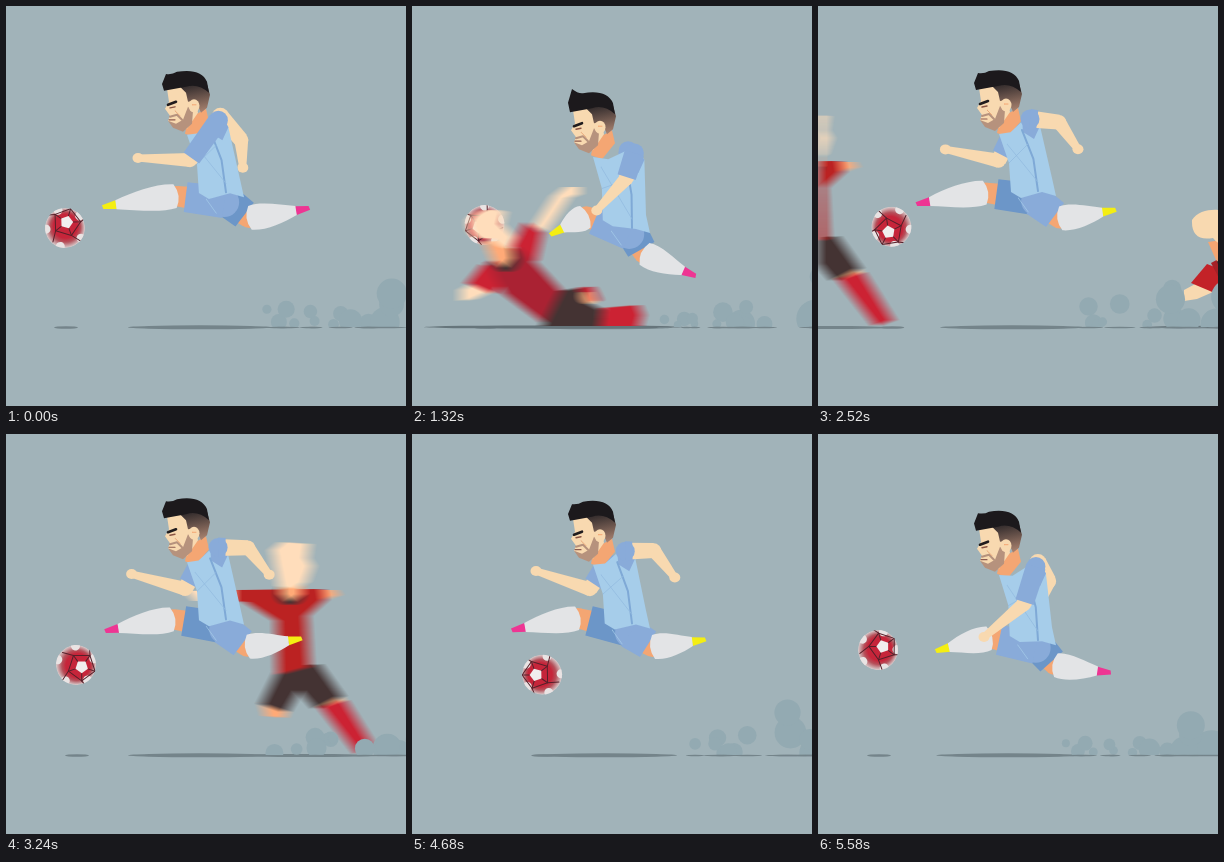
Animation, 400 px wide and 400 px high, one loop 5640 ms. Source, as an HTML page with a canvas:

```html
<!DOCTYPE html>
<html lang="en">
<head>
<meta charset="utf-8">
<title>Runner with ball</title>
<style>
html, body { margin: 0; width: 100%; height: 100%; overflow: hidden; background: #a1b3b9; }
canvas { display: block; width: 400px; height: 400px; }
</style>
</head>
<body>
<canvas id="stage" width="400" height="400"></canvas>
<script>
const stage = document.getElementById('stage').getContext('2d');
const STEP = 60, COUNT = 94, TAU = Math.PI * 2;
const STRIDE = COUNT / 8, HALF = STRIDE / 2;
const SKIN = '#f8d9b0', WARM = '#f4a673', SHIRT = '#a6cdea', BLUE = '#89abd9', DEEP = '#6c96c8';
const RED = '#a52127', BRIGHT = '#c32228', DARK = '#383230', SHADE = '#74848a', DUST = '#93aab2';
let g = stage;

const mod = (a, n) => ((a % n) + n) % n;
const mix = (a, b, u) => a + (b - a) * u;
const clamp = u => Math.max(0, Math.min(1, u));
const rand = n => mod(Math.sin(n * 12.9898 + 4.1) * 43758.5453, 1);

// Eases through a closed loop of key poses; each key is [time, ...values]
function pose(keys, period, t) {
  t = mod(t, period);
  const i = keys.findLastIndex(k => k[0] <= t);
  const a = keys[i], b = keys[(i + 1) % keys.length];
  const u = (t - a[0]) / mod(b[0] - a[0], period);
  return a.slice(1).map((v, k) => mix(v, b[k + 1], (1 - Math.cos(u * Math.PI)) / 2));
}

function poly(color, ...p) {
  g.beginPath();
  for (let i = 0; i < p.length; i += 2) g.lineTo(p[i], p[i + 1]);
  g.closePath();
  g.fillStyle = color;
  g.fill();
}

function oval(color, x, y, rx, ry = rx) {
  g.beginPath();
  g.ellipse(x, y, rx, ry, 0, 0, TAU);
  g.fillStyle = color;
  g.fill();
}

function line(color, width, ...p) {
  g.beginPath();
  for (let i = 0; i < p.length; i += 2) g.lineTo(p[i], p[i + 1]);
  g.strokeStyle = color;
  g.lineWidth = width;
  g.lineCap = g.lineJoin = 'round';
  g.stroke();
}

// Draws in a frame whose x axis runs from one point to another
function along(x1, y1, x2, y2, draw) {
  g.save();
  g.translate(x1, y1);
  g.rotate(Math.atan2(y2 - y1, x2 - x1));
  draw(Math.hypot(x2 - x1, y2 - y1));
  g.restore();
}

function taper(color, x1, y1, w1, x2, y2, w2) {
  along(x1, y1, x2, y2, d => poly(color, 0, -w1, d, -w2, d, w2, 0, w1));
}

// Run cycle: knee and toe, elbow and hand
const LEG = [
  [0, 170, 190, 97, 200], [1.6, 166, 184, 100, 195], [2.5, 186, 246, 168, 311], [3.4, 226, 265, 273, 304],
  [5.9, 243, 212, 303, 203], [7.4, 241, 213, 294, 206], [9.25, 181, 229, 199, 263], [10.75, 172, 204, 118, 216]
];
const ARM = [
  [0, 184, 154, 132, 152], [1.6, 178, 155, 124, 137], [3.4, 185, 200, 138, 211], [4.9, 231, 147, 220, 175],
  [7.2, 242, 113, 264, 140], [9.25, 239, 180, 241, 209], [10.75, 206, 170, 166, 203]
];
const BALL = [[0, 59, 222], [7, 70, 231], [13, 88, 217], [18, 59, 214], [32, 131, 241], [46, 60, 216]];

// How deep the body sinks: 0 in the leap, 1 at push-off
const sink = f => ((1 + Math.cos((f - 3.6) / HALF * TAU)) / 2) ** 1.7;

function leg(t, hx, hy, cloth, boot) {
  const [kx, ky, tx, ty] = pose(LEG, STRIDE, t);
  const sx = mix(hx, kx, 0.8), sy = mix(hy, ky, 0.8);
  taper(WARM, hx, hy, 13, kx, ky, 10);
  oval(WARM, kx, ky, 10);
  oval(cloth, hx, hy, 15);
  taper(cloth, hx, hy, 16, sx, sy, 15);
  along(kx, ky, tx, ty, d => {
    const a = d - 13;
    poly(boot, a - 1, -5, d, -3, d + 1, 1, a, 4);
    g.beginPath();
    g.moveTo(1, -12);
    g.bezierCurveTo(a * 0.3, -15, a * 0.7, -8, a, -5);
    g.lineTo(a, 4);
    g.bezierCurveTo(a * 0.7, 10, a * 0.3, 15, 1, 12);
    g.quadraticCurveTo(-6, 0, 1, -12);
    g.fillStyle = '#e3e4e6';
    g.fill();
  });
}

function arm([ex, ey, hx, hy], sx, sy, sleeve) {
  oval(SKIN, sx, sy, 8.5);
  taper(SKIN, sx, sy, 8.5, ex, ey, 7.5);
  oval(SKIN, ex, ey, 7.2);
  taper(SKIN, ex, ey, 7, hx, hy, 3.5);
  oval(SKIN, hx, hy, 5.5, 5);
  if (!sleeve) return;
  oval(BLUE, sx, sy, 9.5);
  taper(BLUE, sx, sy, 10, mix(sx, ex, sleeve), mix(sy, ey, sleeve), 9.5);
}

function head(dy, lift) {
  g.save();
  g.translate(0, dy);
  poly(WARM, 182, 112, 200, 102, 203, 115, 190, 131, 179, 127);
  poly(SKIN, 161, 82, 186, 78, 192, 106, 181, 122, 168, 119, 162, 114, 164, 109, 159, 102, 163, 95);
  poly('#b6927d', 162, 114, 170, 117, 177, 113, 182, 100, 187, 104, 186, 117, 177, 125, 167, 121);
  line('#b6927d', 2, 164, 110, 171, 108, 176, 113);
  line('#8d5c50', 1.2, 163, 113, 169, 113);
  line('#201c1e', 2.6, 162, 98, 170, 95);
  line('#8a5544', 1.4, 164, 101, 169, 100);
  line('#e9a97c', 1, 169, 104, 174, 109);
  const fade = g.createLinearGradient(186, 76, 192, 106);
  fade.addColorStop(0, '#2b2628');
  fade.addColorStop(1, '#a9826f');
  poly(fade, 174, 80, 200, 74, 204, 88, 201, 101, 195, 106, 190, 94, 182, 95, 180, 86);
  oval(SKIN, 188, 99, 5.5, 6.5);
  line(WARM, 1, 186, 98, 190, 98);
  g.beginPath();
  g.moveTo(158, 84);
  g.lineTo(156, 77 - lift * 0.4);
  g.lineTo(160, 67 - lift);
  g.quadraticCurveTo(166, 68 - lift * 0.4, 171, 65);
  g.quadraticCurveTo(195, 61, 201, 75);
  g.lineTo(203, 86);
  g.quadraticCurveTo(192, 76, 180, 80);
  g.closePath();
  g.fillStyle = '#1c191c';
  g.fill();
  g.restore();
}

function player(f) {
  const e = sink(f);
  // Shirt corners: chest, shoulder, back hem, front hem
  const ax = 181, ay = 128 + 31 * e, bx = 214 + 14 * e, by = 106 + 46 * e;
  const cx = 238, cy = 184 + 50 * e, dx = 193 - 3 * e, dy = 186 + 38 * e;
  const hx = mix(dx, cx, 0.56), hy = mix(dy, cy, 0.56) + 9;
  const far = pose(ARM, STRIDE, f + HALF), near = pose(ARM, STRIDE, f);
  const back = clamp((far[2] - 140) / 80);
  arm(far, mix(ax + 14, bx, back), mix(ay - 2, by + 3, back), far[2] < far[0] - 20 ? 0.8 : 0);
  leg(f + HALF, hx + 3, hy, DEEP, '#ee3593');
  leg(f, hx, hy + 1, BLUE, '#f4ee12');
  head(30 * e, 22 * e * e - 8 * e);
  const mx = mix(ax, dx, 0.5) + 4, my = mix(ay, dy, 0.5);
  poly(SHIRT, ax, ay, mix(ax, bx, 0.35), mix(ay, by, 0.35) + 6, bx, by, bx + 8, by + 14,
    cx - 4, cy - 12, cx, cy + 6, cx - 14, cy + 2, dx + 10, dy + 6, dx, dy, mx, my);
  poly(BLUE, bx - 10, by + 7, bx, by, bx + 8, by + 14, bx + 2, by + 27, bx - 9, by + 20);
  line('#7fa9d6', 2, bx - 10, by + 18, mix(bx, cx, 0.6) - 13, mix(by, cy, 0.6), cx - 18, cy + 1);
  line('#93bbe0', 0.8, ax + 8, ay + 10, cx - 18, cy - 8);
  line('#93bbe0', 0.8, mx, my, bx - 4, by + 32);
  line(SHIRT, 0.7, hx - 18, hy - 2, hx - 8, hy + 12);
  arm(near, bx - 2, by + 7, near[2] < near[0] - 20 ? 0.95 : 0.25);
}

function ball(x, y, turn) {
  g.save();
  g.translate(x, y);
  g.rotate(turn);
  g.beginPath();
  g.arc(0, 0, 20, 0, TAU);
  g.clip();
  const body = g.createRadialGradient(2, 0, 12, 0, 0, 20);
  body.addColorStop(0, '#c6253a');
  body.addColorStop(0.4, '#b5505a');
  body.addColorStop(1, '#d8cfcf');
  oval(body, 0, 0, 20);
  const spot = (r, a) => [6 + Math.cos(a) * r, Math.sin(a) * r];
  const patch = [];
  for (let i = 0; i < 5; i++) {
    const a = i * TAU / 5, p = spot(14, a);
    patch.push(...spot(6.5, a));
    oval('#e9e3e3', Math.cos(a + 0.6) * 19, Math.sin(a + 0.6) * 19, 4.5);
    line('#56202a', 1, ...spot(6.5, a), ...p, ...spot(24, a - 0.3));
    line('#56202a', 1, ...p, ...spot(14, a + TAU / 5));
  }
  poly('#f1eeee', ...patch);
  g.restore();
}

function slider() {
  poly(SKIN, 230, 220, 250, 190, 262, 181, 276, 181, 276, 188, 265, 192, 242, 226);
  poly(SKIN, 157, 284, 172, 276, 186, 286, 170, 293, 157, 295);
  poly(BRIGHT, 209, 240, 222, 216, 238, 227, 232, 254, 224, 260);
  poly(BRIGHT, 164, 277, 180, 258, 206, 268, 190, 288);
  poly(RED, 184, 257, 213, 241, 226, 252, 258, 286, 242, 318, 200, 287);
  poly(DARK, 257, 285, 281, 281, 286, 298, 298, 304, 297, 320, 239, 320);
  oval(WARM, 285, 290, 8);
  line(BRIGHT, 5, 278, 284, 287, 283, 292, 293);
  poly(BRIGHT, 299, 302, 334, 299, 338, 309, 335, 320, 296, 320);
  oval(DARK, 202, 253, 12, 13);
  poly(WARM, 181, 236, 206, 232, 209, 252, 200, 262, 189, 254);
  g.beginPath();
  g.moveTo(165, 214);
  g.bezierCurveTo(172, 203, 190, 202, 201, 206);
  g.lineTo(198, 218);
  g.lineTo(211, 231);
  g.lineTo(206, 243);
  g.quadraticCurveTo(192, 240, 186, 232);
  g.quadraticCurveTo(164, 236, 165, 214);
  g.fillStyle = SKIN;
  g.fill();
}

function marker() {
  poly(SKIN, 180, 157, 240, 156, 240, 167, 190, 167);
  poly(WARM, 306, 156, 329, 156, 332, 161, 312, 168);
  poly(WARM, 256, 268, 284, 268, 278, 284, 260, 282);
  poly(WARM, 310, 264, 332, 260, 338, 270, 316, 275);
  poly(BRIGHT, 315, 273, 338, 266, 368, 314, 352, 320);
  poly(DARK, 273, 236, 312, 230, 335, 262, 310, 275, 293, 256, 280, 278, 256, 270);
  poly('#b41a21', 228, 156, 316, 155, 318, 166, 300, 182, 303, 233, 272, 241, 271, 187, 240, 168, 228, 167);
  oval(DARK, 284, 160, 12, 11);
  poly(WARM, 274, 145, 296, 142, 296, 160, 284, 168, 275, 160);
  poly(SKIN, 266, 116, 276, 108, 303, 110, 301, 124, 306, 132, 300, 148, 288, 155, 273, 152);
}

const layer = () => {
  const c = document.createElement('canvas');
  c.width = c.height = 400;
  return c.getContext('2d');
};
const sharp = layer(), soft = layer();

// Draws a figure with a horizontal smear of the given reach
function smear(draw, dx, reach) {
  g = sharp;
  g.clearRect(0, 0, 400, 400);
  g.save();
  g.translate(dx, 0);
  draw();
  g.restore();
  soft.clearRect(0, 0, 400, 400);
  soft.globalCompositeOperation = 'lighter';
  const n = 2 * reach + 1;
  soft.globalAlpha = 1 / n;
  for (let i = -reach; i <= reach; i++) soft.drawImage(sharp.canvas, i, 0);
  g = stage;
  g.drawImage(soft.canvas, 0, 0);
}

// Each push-off throws up a cloud that drifts back, swells and rises
function dust(f) {
  const marks = [];
  g.save();
  g.beginPath();
  g.rect(0, 0, 400, 321);
  g.clip();
  for (let k = 0; k < 16; k++) {
    const age = mod(f - 3.2 - k * HALF, COUNT);
    if (age > 14) continue;
    for (let i = 1; i < 8; i++) {
      const s = k * 8 + i;
      const x = 218 + 13 * age + rand(s) * 75;
      const r = (4 + 6 * rand(s + 200)) * (0.6 + 0.12 * age) * clamp(age + 0.2);
      oval(DUST, x, 319 - rand(s + 400) ** 2 * age * 6, r);
      if (i < 5) marks.push([x, r]);
    }
  }
  g.restore();
  for (const [x, r] of marks) oval(SHADE, x, 321.5, r * 1.6, 0.8);
}

function scene(f) {
  g = stage;
  g.fillStyle = '#a1b3b9';
  g.fillRect(0, 0, 400, 400);
  const [bx, by] = pose(BALL, COUNT / 2, f);
  const d = f - 31;
  const slide = d * (d < 0 ? 8.6 - 0.38 * d : 19);
  const chase = (f - 54) * 24.5;
  const sliding = slide > -345 && slide < 250, chasing = chase > -380 && chase < 230;
  oval(SHADE, 194 - 9 * sink(f), 321.3, 72, 2);
  oval(SHADE, bx + 1, 321.5, 12, 1.3);
  if (sliding) oval('#66757b', 250 + slide, 321, 130, 1.6);
  if (chasing) {
    oval(SHADE, 300 + chase, 321.5, 70, 1.5);
    smear(marker, chase, 8);
  }
  player(f);
  ball(bx, by, -1.29 - f * 10 * TAU / COUNT);
  if (sliding) smear(slider, slide, d < -6 ? 8 : 0);
  dust(f);
}

const start = performance.now();
function tick() {
  scene(Math.floor((performance.now() - start) / STEP) % COUNT);
  requestAnimationFrame(tick);
}
tick();
</script>
</body>
</html>
```
